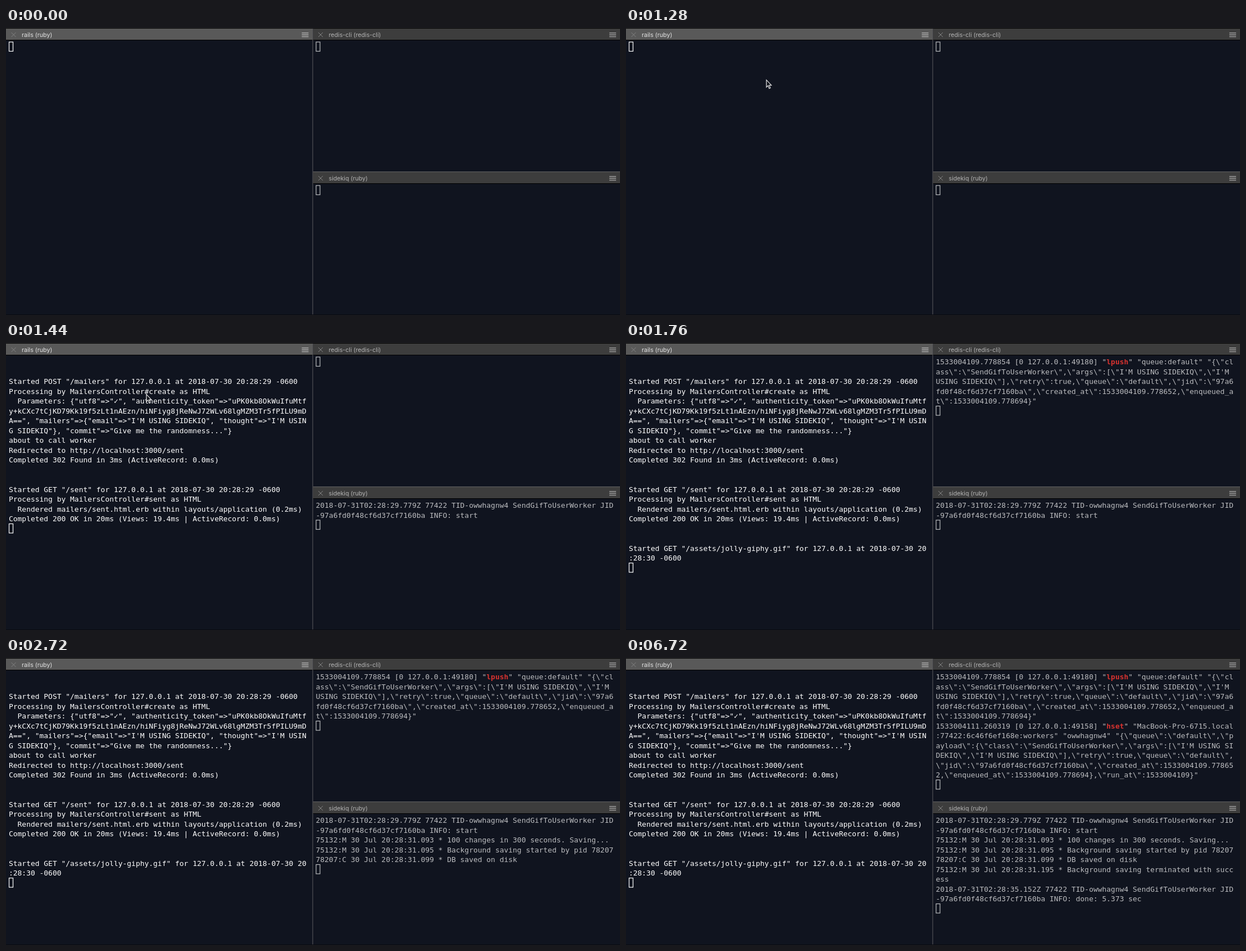
These frames come from a looping animation (1093 px wide and 512 px high, 9.92 s). An HTML page with a canvas:

```html
<!DOCTYPE html>
<html lang="en">
<head>
<meta charset="utf-8">
<title>Terminal panes</title>
<style>
html, body { margin: 0; width: 100%; height: 100%; overflow: hidden; background: #10141f; }
canvas { display: block; }
</style>
</head>
<body>
<canvas id="stage" width="1093" height="512"></canvas>
<script>
const LOOP = 9920, COLS = 68, CELL = 7.79, ROW = 17.5;
const MONO = '12.95px "DejaVu Sans Mono", monospace';
const ctx = document.getElementById('stage').getContext('2d');

// Each pane's output arrives in chunks: [time, text].
const panes = [
  { x: 0, y: 0, w: 546, title: 'rails (ruby)', bar: '#595959', label: '#e4e4e4', icon: '#a2a2a2', ink: '#fff',
    output: [
      [1440, `

Started POST "/mailers" for 127.0.0.1 at 2018-07-30 20:28:29 -0600
Processing by MailersController#create as HTML
  Parameters: {"utf8"=>"✓", "authenticity_token"=>"uPK0kb8OkWuIfuMtfy+kCXc7tCjKD79Kk19f5zLt1nAEzn/hiNFiyg8jReNwJ72WLv68lgMZM3Tr5fPILU9mDA==", "mailers"=>{"email"=>"I'M USING SIDEKIQ", "thought"=>"I'M USING SIDEKIQ"}, "commit"=>"Give me the randomness..."}
about to call worker
Redirected to http://localhost:3000/sent
Completed 302 Found in 3ms (ActiveRecord: 0.0ms)


Started GET "/sent" for 127.0.0.1 at 2018-07-30 20:28:29 -0600
Processing by MailersController#sent as HTML
  Rendered mailers/sent.html.erb within layouts/application (0.2ms)
Completed 200 OK in 20ms (Views: 19.4ms | ActiveRecord: 0.0ms)
`],
      [1760, `

Started GET "/assets/jolly-giphy.gif" for 127.0.0.1 at 2018-07-30 20:28:30 -0600
`]] },
  { x: 546.5, y: 0, w: 547, title: 'redis-cli (redis-cli)', bar: '#3d3d3d', label: '#b4b4b4', icon: '#929292', ink: '#bbbcbf',
    output: [
      [1600, String.raw`1533004109.778854 [0 127.0.0.1:49180] "lpush" "queue:default" "{\"class\":\"SendGifToUserWorker\",\"args\":[\"I'M USING SIDEKIQ\",\"I'M USING SIDEKIQ\"],\"retry\":true,\"queue\":\"default\",\"jid\":\"97a6fd0f48cf6d37cf7160ba\",\"created_at\":1533004109.778652,\"enqueued_at\":1533004109.778694}"
`],
      [2880, String.raw`1533004111.260319 [0 127.0.0.1:49158] "hset" "MacBook-Pro-6715.local:77422:6c46f6ef168e:workers" "owwhagnw4" "{\"queue\":\"default\",\"payload\":{\"class\":\"SendGifToUserWorker\",\"args\":[\"I'M USING SIDEKIQ\",\"I'M USING SIDEKIQ\"],\"retry\":true,\"queue\":\"default\",\"jid\":\"97a6fd0f48cf6d37cf7160ba\",\"created_at\":1533004109.778652,\"enqueued_at\":1533004109.778694},\"run_at\":1533004109}"
`]] },
  { x: 546.5, y: 256, w: 547, title: 'sidekiq (ruby)', bar: '#3d3d3d', label: '#b4b4b4', icon: '#929292', ink: '#bbbcbf',
    output: [
      [1440, `2018-07-31T02:28:29.779Z 77422 TID-owwhagnw4 SendGifToUserWorker JID-97a6fd0f48cf6d37cf7160ba INFO: start
`],
      [2720, `75132:M 30 Jul 20:28:31.093 * 100 changes in 300 seconds. Saving...
75132:M 30 Jul 20:28:31.095 * Background saving started by pid 78207
78207:C 30 Jul 20:28:31.099 * DB saved on disk
`],
      [2880, `75132:M 30 Jul 20:28:31.195 * Background saving terminated with success
`],
      [6720, `2018-07-31T02:28:35.152Z 77422 TID-owwhagnw4 SendGifToUserWorker JID-97a6fd0f48cf6d37cf7160ba INFO: done: 5.373 sec
`]] },
];

// Pointer positions, one every 160 ms from 320 ms on.
const pointerPath = [[93, 420], [189, 368], [170, 252], [188, 180], [236, 107], [246, 96], [249, 92], [249, 91], [249, 91]];
const arrow = new Path2D('M1 .7V13.6L3.9 10.9L5.9 15.9L8 15L6 10.2H9.8Z');

function rect(color, x, y, w, h) {
  ctx.fillStyle = color;
  ctx.fillRect(x, y, w, h);
}

function drawHeader({ x, y, w, title, bar, label, icon }) {
  rect('#000', x, y, w, 22);
  rect(bar, x, y + 1, w, 20);
  if (y) rect('#626262', x, y, w, 1);
  ctx.strokeStyle = '#828282';
  ctx.lineWidth = 1;
  ctx.beginPath();
  ctx.moveTo(x + 9.5, y + 8);
  ctx.lineTo(x + 17.5, y + 16);
  ctx.moveTo(x + 17.5, y + 8);
  ctx.lineTo(x + 9.5, y + 16);
  ctx.stroke();
  for (const dy of [8, 11.3, 14.6]) rect(icon, x + w - 19.5, y + dy, 12, 1.7);
  ctx.font = '10.7px Inter, sans-serif';
  ctx.fillStyle = label;
  ctx.fillText(title, x + 28, y + 16);
}

function wrap(text) {
  return text.split('\n').flatMap(line => line.match(new RegExp(`.{1,${COLS}}`, 'g')) || ['']);
}

function drawOutput({ x, y, ink, output }, time) {
  const lines = wrap(output.filter(([at]) => time >= at).map(([, text]) => text).join(''));
  const left = x + 5;
  lines.forEach((line, row) => {
    const command = /lpush|hset/.exec(line);
    [...line].forEach((char, col) => {
      const marked = command && col >= command.index && col < command.index + command[0].length;
      ctx.font = (marked ? 'bold ' : '') + MONO;
      ctx.fillStyle = marked ? '#d8322f' : ink;
      ctx.fillText(char, left + col * CELL, y + 38 + row * ROW);
    });
  });
  ctx.strokeStyle = ink;
  ctx.lineWidth = 1.2;
  ctx.strokeRect(left + .5, y + 25 + (lines.length - 1) * ROW, 7, 16.5);
}

function drawPointer(time) {
  const spot = pointerPath[Math.floor((time - 320) / 160)];
  if (!spot) return;
  ctx.save();
  ctx.translate(...spot);
  ctx.fillStyle = '#10131a';
  ctx.fill(arrow);
  ctx.strokeStyle = '#e8e8e8';
  ctx.lineWidth = 1.2;
  ctx.stroke(arrow);
  ctx.restore();
}

function draw() {
  const time = performance.now() % LOOP;
  rect('#10141f', 0, 0, 1093, 512);
  for (const pane of panes) {
    drawHeader(pane);
    drawOutput(pane, time);
  }
  rect('#5c5d61', 545.5, 1, 1, 511);
  rect('#090b11', 0, 511, 1093, 1);
  drawPointer(time);
  requestAnimationFrame(draw);
}
draw();
</script>
</body>
</html>
```
